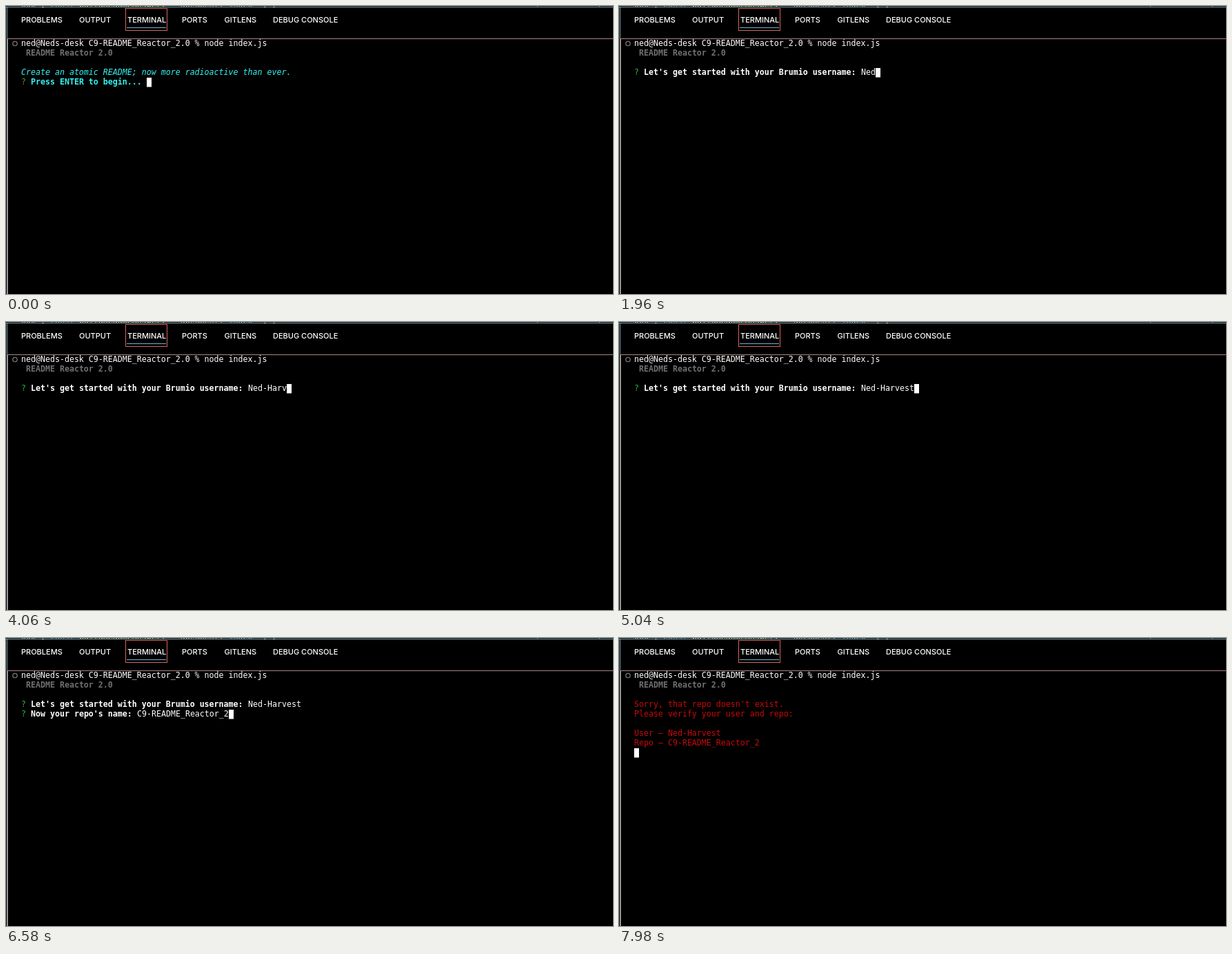
An HTML page for the animation above (8 s loop, 880 by 418 pixels).

```html
<!DOCTYPE html>
<html lang="en">
<head>
<meta charset="utf-8">
<title>Terminal session</title>
<style>
  html, body { margin: 0; width: 100%; height: 100%; overflow: hidden; background: #000; }
  svg { display: block; width: 880px; height: 418px; }
  text { white-space: pre; fill: #fff; }
  .tabs text { font: 500 11px Inter, sans-serif; }
  .mono text { font: 11.627px "DejaVu Sans Mono", monospace; }
  .mono .bold { font-weight: 700; }
  .mono .italic { font-style: italic; }
</style>
</head>
<body>
<svg viewBox="0 0 880 418">
  <rect width="880" height="418"/>
  <svg class="mono" width="880" height="3">
    <text x="22" y="2"><tspan fill="#aaa">xxx | </tspan><tspan fill="#4a90c8">const </tspan><tspan fill="#c9c27a">buildReadmeAnswer: </tspan><tspan fill="#c8946c"> 'document: </tspan><tspan fill="#5fa8d8">index' </tspan><tspan fill="#d0c060">( )</tspan></text>
    <path d="M770.5 0V2M860.5 0V2" stroke="#777"/>
  </svg>
  <path d="M0 1.5H880M1.5 1V418" fill="none" stroke="#7fa3ad"/>
  <path d="M2.5 418V47.5H880" fill="none" stroke="#a98682"/>
  <g class="tabs" id="tabs"></g>
  <rect x="173.5" y="3.5" width="60" height="32" fill="none" stroke="#d4675f"/>
  <path d="M175 31.5H232" stroke="#6eb4d8"/>
  <circle cx="13" cy="54.5" r="3.2" fill="none" stroke="#777" stroke-width="1.3"/>
  <g class="mono" id="screen"></g>
  <rect id="cursor" width="7" height="13.5" fill="#fff"/>
</svg>
<script>
const LOOP = 8000, LEFT = 22, COL = 7, ROW = 14;
const USER = "Ned-Harvest", REPO = "C9-README_Reactor_2";
const GREEN = "#27b33c", CYAN = "#35f2f2", RED = "#c80a0a", GREY = "#707070";
const screen = document.getElementById("screen");
const cursor = document.getElementById("cursor");

function addText(parent, x, y, content, fill = "#fff", style = "") {
  const node = document.createElementNS("http://www.w3.org/2000/svg", "text");
  node.setAttribute("x", x);
  node.setAttribute("y", y);
  node.setAttribute("class", style);
  node.style.fill = fill;
  node.textContent = content;
  parent.append(node);
}

const print = (row, col, content, fill, style) =>
  addText(screen, LEFT + col * COL, 58 + row * ROW, content, fill, style);

function moveCursor(row, col) {
  cursor.setAttribute("x", LEFT + col * COL);
  cursor.setAttribute("y", 48 + row * ROW - (row === 3 ? 1 : 0) + (row === 3 ? 1 : 0));
}

function ask(row, question, answer = "", fill = "#fff", mark = GREEN) {
  print(row, 0, "?", mark);
  print(row, 2, question, fill, "bold");
  print(row, question.length + 3, answer);
  moveCursor(row, question.length + 3 + answer.length);
}

function welcome() {
  print(3, 0, "Create an atomic README; now more radioactive than ever.", CYAN, "italic");
  ask(4, "Press ENTER to begin...", "", CYAN, "#5f8f32");
}

const askUser = count => ask(3, "Let's get started with your Brumio username:", USER.slice(0, count));

function askRepo(answer) {
  askUser(USER.length);
  ask(4, "Now your repo's name:", answer);
}

function fail() {
  const lines = ["Sorry, that repo doesn't exist.", "Please verify your user and repo:", "",
    "User – " + USER, "Repo – " + REPO];
  lines.forEach((line, i) => print(3 + i, 0, line, RED));
  moveCursor(8, 0);
}

const keyTimes = [1540, 1680, 1960, 2240, 2660, 2940, 3220, 3640, 4200, 4480, 4760];
const steps = [
  [0, welcome],
  [280, () => askUser(0)],
  ...keyTimes.map((time, i) => [time, () => askUser(i + 1)]),
  [5320, () => askRepo("")],
  [6300, () => askRepo(REPO)],
  [7700, fail]
];

const tabs = { PROBLEMS: 22, OUTPUT: 106, TERMINAL: 176, PORTS: 255, GITLENS: 316.5, "DEBUG CONSOLE": 387 };
for (const [label, x] of Object.entries(tabs))
  addText(document.getElementById("tabs"), x, 24, label);

let shown;
function render() {
  const time = performance.now() % LOOP;
  const step = steps.findLast(([start]) => start <= time);
  if (step !== shown) {
    shown = step;
    screen.replaceChildren();
    print(0, 0, "ned@Neds-desk C9-README_Reactor_2.0 % node index.js");
    print(1, 1, "README Reactor 2.0", GREY, "bold");
    step[1]();
  }
  requestAnimationFrame(render);
}
render();
</script>
</body>
</html>
```
